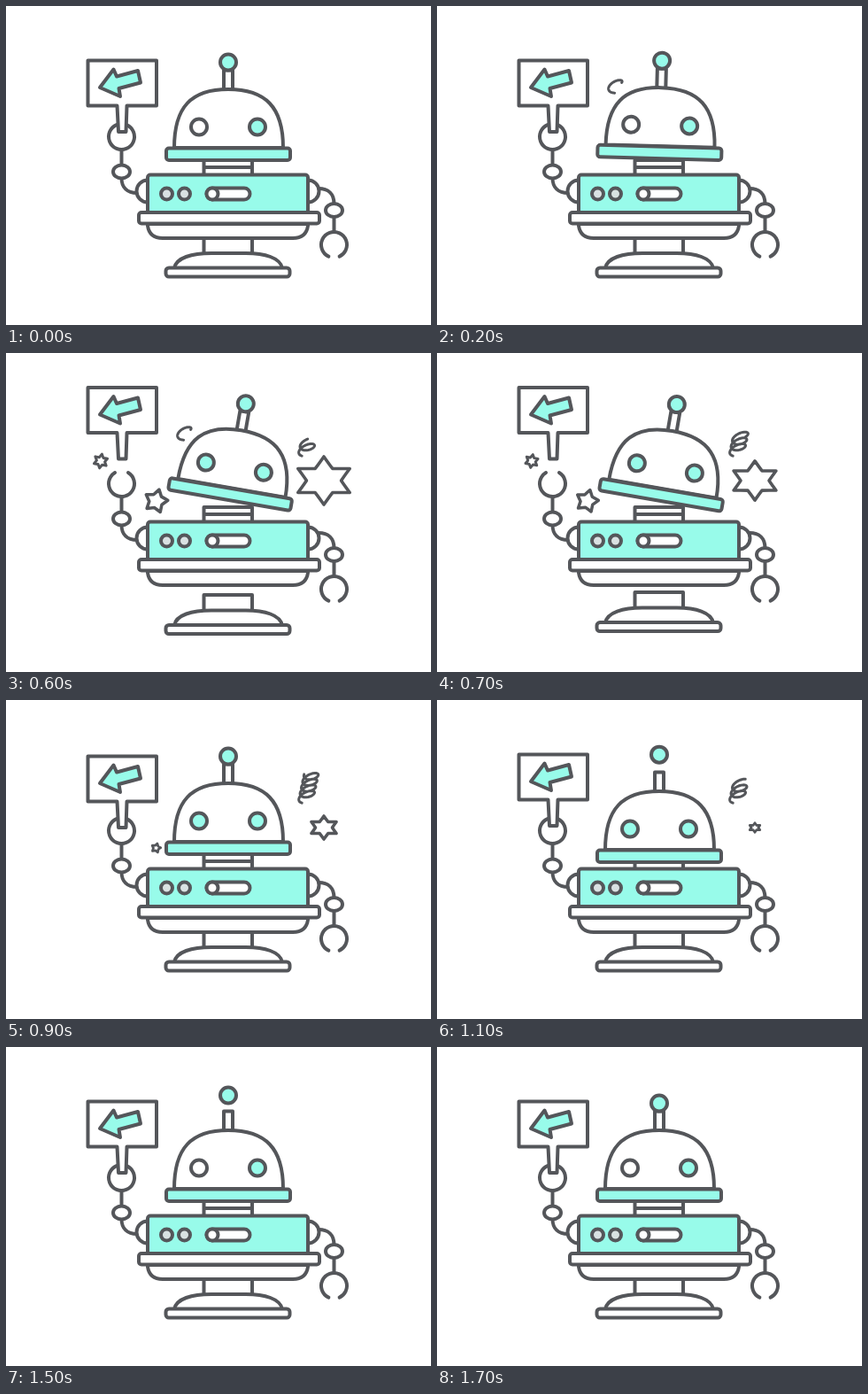
An HTML page with a canvas that plays this animation: 480 px wide and 360 px high, repeating every 2200 ms.

```html
<!DOCTYPE html>
<html lang="en">
<head>
<meta charset="utf-8">
<title>Broken robot</title>
<style>
html, body { margin: 0; width: 100%; height: 100%; overflow: hidden; background: #fff; }
canvas { display: block; width: 480px; height: 360px; }
</style>
</head>
<body>
<canvas id="stage" width="480" height="360"></canvas>
<script>
const ctx = document.getElementById('stage').getContext('2d');
const LOOP = 2200, STEP = 100;
const INK = '#54565a', MINT = '#98fbea', WHITE = '#fff', PALE = '#d9e1e2';
const DEG = Math.PI / 180, TAU = Math.PI * 2;

// Timing rules; t counts steps of the loop.
const linear = (t, a, b) => Math.min(1, Math.max(0, (t - a) / (b - a)));
const ease = (t, a, b) => {
  const u = linear(t, a, b);
  return u * u * (3 - 2 * u);
};
const bump = (t, rise, top, fall, end) => ease(t, rise, top) - ease(t, fall, end);
const burst = (t, born, peak, gone) =>
  linear(t, born, peak) * (1 - linear(t, peak, gone)) ** 1.3;

function paint(path, fill) {
  if (fill) {
    ctx.fillStyle = fill;
    ctx.fill(path);
  }
  ctx.stroke(path);
}

const shape = (d, fill) => paint(new Path2D(d), fill);

function box(x, y, w, h, r, fill) {
  const path = new Path2D();
  path.roundRect(x, y, w, h, r);
  paint(path, fill);
}

function oval(x, y, rx, ry, fill) {
  const path = new Path2D();
  path.ellipse(x, y, rx, ry, 0, 0, TAU);
  paint(path, fill);
}

const dot = (x, y, r, fill) => oval(x, y, r, r, fill);

function claw(x, y, facing, gap) {
  const path = new Path2D();
  path.arc(x, y, 14.5, (facing + gap) * DEG, (facing + 360 - gap) * DEG);
  paint(path);
}

function shifted(x, y, draw) {
  ctx.save();
  ctx.translate(x, y);
  draw();
  ctx.restore();
}

// A star with sides that bend inwards.
function star(x, y, points, size, stretch, turn) {
  if (size < 1) return;
  const path = new Path2D();
  const at = (i, k) => {
    const a = turn * DEG + i * Math.PI / points;
    return [x + Math.cos(a) * size * stretch * k, y + Math.sin(a) * size * k];
  };
  path.moveTo(...at(0, 1));
  for (let i = 0; i < points * 2; i++) {
    path.quadraticCurveTo(...at(i + 0.5, 0.7), ...at(i + 1, i % 2 ? 1 : 0.58));
  }
  path.closePath();
  ctx.lineWidth = Math.min(3.6, 2.2 + size / 10);
  paint(path, WHITE);
}

// A tilted spring that grows out of its tail and shrinks back into it.
function spring(x, y, dx, dy, turns, hidden) {
  if (hidden > 0.98) return;
  const path = new Path2D(), count = 90, tilt = -0.35;
  for (let i = 0; i <= count; i++) {
    const u = hidden + (1 - hidden) * i / count, a = 3.6 - u * turns * TAU;
    const px = 9 * Math.cos(a), py = 4.5 * Math.sin(a);
    path.lineTo(
      x + dx * u + px * Math.cos(tilt) - py * Math.sin(tilt),
      y + dy * u + px * Math.sin(tilt) + py * Math.cos(tilt)
    );
  }
  ctx.lineWidth = 3;
  paint(path);
}

function drawBase(t) {
  shifted(0, 11.5 * bump(t, 4, 6, 6, 9), () => {
    box(223.5, 261.5, 54.5, 22, 0, WHITE);
    shape('M190 296C192 284 210 279 232 279H271C292 279 310 284 312 296Z', WHITE);
    box(180.5, 295.5, 140, 10, 3.5, WHITE);
  });
}

function drawArms(lift) {
  shape('M130.5 194C130.5 205 137 211 148 211');
  shape('M130.5 180V162');
  oval(130.5, 187, 9.5, 7.5, WHITE);
  claw(130.5, 147.5, -90, 23 + 8 * lift);
  shifted(0, -3 * lift, () => {
    shape('M353 206C364 206 370.5 212 370.5 223');
    shape('M370.5 238V255');
    oval(370.5, 230.5, 9.5, 7.5, WHITE);
    claw(370.5, 269.5, 90, 25);
  });
  dot(160, 209, 12.5, WHITE);
  dot(341, 209, 12.5, WHITE);
}

function drawBody() {
  box(223.5, 174, 54.5, 18, 0, WHITE);
  shape('M224 182H278');
  box(160, 190.5, 181, 43, 3, MINT);
  dot(181.5, 212, 6.5, PALE);
  dot(201.5, 212, 6.5, PALE);
  box(226.5, 205.5, 49, 13, 6.5, WHITE);
  dot(233, 212, 6.5, WHITE);
  shape('M160 246V248Q162 262 177 262H324Q339 262 341 248V246Z', WHITE);
  box(150, 233, 204, 12.5, 3, WHITE);
}

function drawSign(t, lift) {
  shifted(0, 2 * bump(t, 8, 9, 9, 10) - 22.5 * lift, () => {
    shape('M92.5 61.5H170V112.5H136.5L135.5 142H127L125.5 112.5H92.5Z', WHITE);
    shape('M106 92L121.5 71.5L125 79.5L149 73L152 86.5L127.5 93L129 102Z', MINT);
  });
}

function drawHead(t) {
  const lean = bump(t, 1, 5, 7, 9);
  const hop = 7 * lean + 3 * bump(t, 1, 4, 4, 7);
  const sink = 9 * bump(t, 9, 11, 11, 14);
  const pop = 18 * bump(t, 10.5, 13, 13, 17);
  const leftEye = t < 3 || t >= 15 ? WHITE : MINT;
  const rightEye = t >= 3 && t <= 5 ? WHITE : MINT;
  ctx.save();
  ctx.translate(251 + 2.2 * lean, 167 - hop + sink);
  ctx.rotate(9.8 * lean * DEG);
  box(-5, -94.5, 10, 23, 0, WHITE);
  shape('M-61 -7C-61 -53 -42 -73 0 -73S62 -53 62 -7Z', WHITE);
  box(-70, -6.5, 140, 13.5, 3, MINT);
  dot(-33, -30.5, 9, leftEye);
  dot(33, -30.5, 9, rightEye);
  dot(0, -103.5 - sink - pop, 9, MINT);
  ctx.restore();
}

function drawSparks(t) {
  star(359, 144, 6, 27 * burst(t, 2, 6, 13), 1.25, 30);
  star(169.5, 167, 5, 15 * burst(t, 2, 6.5, 11), 1, -75);
  star(107, 122, 6, 10 * burst(t, 4, 6.5, 9), 1, -80);
  spring(195, 76, 8, 17, 2.25, Math.max(1 - linear(t, 1, 4), linear(t, 4, 7)));
  spring(345, 83, -6, 28, 4.2, Math.max(1 - linear(t, 5, 8), linear(t, 9, 14)));
}

function render(now) {
  const t = Math.floor(now % LOOP / STEP);
  const lift = bump(t, 4, 6, 7, 9);

  ctx.fillStyle = WHITE;
  ctx.fillRect(0, 0, 480, 360);
  ctx.strokeStyle = INK;
  ctx.lineWidth = 4;
  ctx.lineJoin = ctx.lineCap = 'round';
  drawBase(t);
  drawArms(lift);
  drawBody();
  drawSign(t, lift);
  drawHead(t);
  drawSparks(t);
}

const start = performance.now();
function tick() {
  render(performance.now() - start);
  requestAnimationFrame(tick);
}
tick();
</script>
</body>
</html>
```
